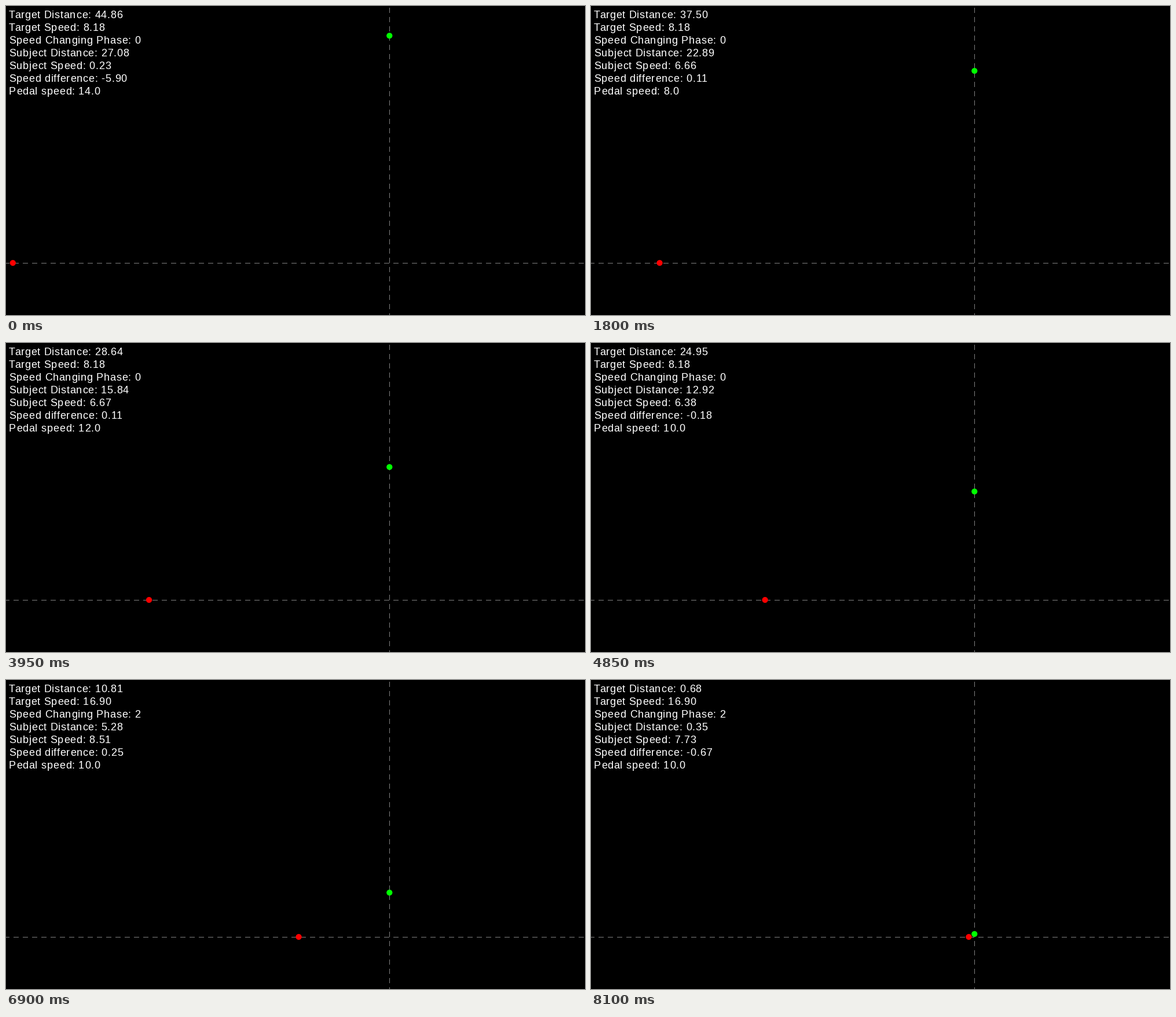
Recreate the animation shown at these times as a matplotlib script. Size 1000 px wide and 534 px high, loop 8.15 s.

```python
import numpy as np
import matplotlib.pyplot as plt
from matplotlib.animation import FuncAnimation
from matplotlib.patches import Circle
from matplotlib.textpath import TextPath

W, H, DPI = 1000, 534, 100
FRAMES, STEP = 163, 50
CROSS_X, CROSS_Y, SCALE = 662, 444, 14.5
FONT_PX, TRACKING = 18, 0.77
LEFT, BASELINE, LINE_H = 5, 21, 22

plt.rcParams["font.family"] = "Liberation Sans"

# --- motion -----------------------------------------------------------
t = np.arange(FRAMES) * STEP / 1000
KEYS = [0, 1.8, 2.8, 3.95, 5.7, 6.9, 8.1]
RAMP_START, RAMP_END = 5.11, 6.06


def travel(speed, marks):
    """Distance left at half-rate playback, passing through the marks."""
    steps = (speed[1:] + speed[:-1]) / 2 * (STEP / 2000)
    left = marks[0] - np.concatenate([[0], np.cumsum(steps)])
    at_keys = np.interp(KEYS, t, left)
    return left + np.interp(t, KEYS, np.array(marks) - at_keys)


target_speed = np.interp(t, [RAMP_START, 5.7, RAMP_END], [8.18, 13.59, 16.90])
target_dist = travel(target_speed,
                     [44.86, 37.50, 33.41, 28.64, 20.66, 10.81, 0.68])

subject_speed = np.interp(
    t,
    [0, 1.05, 1.8, 2.3, 2.8, 3.4, 3.95, 5.0, 5.7, 6.3, 6.9, 7.5, 8.1],
    [0.23, 6.5, 6.66, 6.37, 6.55, 6.67, 6.67, 6.33, 7.17, 8.22, 8.51, 8.32, 7.73])
subject_dist = travel(subject_speed,
                      [27.08, 22.89, 19.66, 15.84, 10.10, 5.28, 0.35])

time_left = np.interp(
    t,
    [0, 1.8, 2.8, 3.95, RAMP_START, 5.7, RAMP_END, 6.9, 8.1],
    [4.418, 3.495, 2.997, 2.415, 1.84, 1.385, 1.062, 0.639, 0.04167])
speed_diff = subject_speed - subject_dist / time_left

phase = (t >= RAMP_START).astype(int) + (t >= RAMP_END)

PEDAL_TIMES = np.array([0, 1.2, 2.4, 4.6, 5.2, 6.5])
PEDAL_VALUES = np.array([14, 8, 12, 10, 14, 10])
pedal = PEDAL_VALUES[np.searchsorted(PEDAL_TIMES, t, side="right") - 1]

READOUT = [
    ("Target Distance: ", target_dist, "{:.2f}"),
    ("Target Speed: ", target_speed, "{:.2f}"),
    ("Speed Changing Phase: ", phase, "{:d}"),
    ("Subject Distance: ", subject_dist, "{:.2f}"),
    ("Subject Speed: ", subject_speed, "{:.2f}"),
    ("Speed difference: ", speed_diff, "{:.2f}"),
    ("Pedal speed: ", pedal, "{:.1f}"),
]

# --- stage ------------------------------------------------------------
fig = plt.figure(figsize=(W / DPI, H / DPI), dpi=DPI, facecolor="black")
ax = fig.add_axes([0, 0, 1, 1])

dash = dict(facecolor="#808080", edgecolor="none", linewidth=0, antialiased=False)
ax.broken_barh([(x, 9) for x in range(-3, W, 16)], (CROSS_Y, 1), **dash)
for y in range(3, H, 16):
    ax.broken_barh([(CROSS_X, 1)], (y, 9), **dash)

red = ax.add_patch(Circle((0, CROSS_Y), 5.1, color="#ff0000", lw=0, zorder=3))
green = ax.add_patch(Circle((CROSS_X + 0.3, 0), 5.1, color="#00ff00", lw=0, zorder=4))

ax.set_xlim(0, W)
ax.set_ylim(H, 0)
ax.axis("off")

# --- letter-spaced text -----------------------------------------------
advances = {}


def right_edge(s):
    return TextPath((0, 0), s, size=FONT_PX).get_extents().x1


def advance(a, b):
    """Pen step from a to b, kerning included."""
    if (a, b) not in advances:
        mark = "|" if b == " " else b
        advances[a, b] = right_edge(a + mark) - right_edge(mark) + TRACKING
    return advances[a, b]


def layout(s, x):
    """Pen position of each letter, then the end position."""
    pens = [x]
    for a, b in zip(s, s[1:] + " "):
        pens.append(pens[-1] + advance(a, b))
    return pens


def glyph(x, y, c=""):
    return ax.text(x, y, c, color="white", fontsize=FONT_PX * 72 / DPI,
                   ha="left", va="baseline", zorder=5)


rows = []
for i, (label, values, fmt) in enumerate(READOUT):
    base = BASELINE + i * LINE_H
    pens = layout(label, LEFT)
    for c, x in zip(label, pens):
        if c != " ":
            glyph(x, base, c)
    rows.append((pens[-1], [glyph(0, base) for _ in range(5)], values, fmt))


def draw(k):
    red.center = (CROSS_X + 0.3 - SCALE * target_dist[k], CROSS_Y)
    green.center = (CROSS_X + 0.3, CROSS_Y - SCALE * subject_dist[k])
    for x, slots, values, fmt in rows:
        s = fmt.format(values[k])
        pens = layout(s, x)
        for j, slot in enumerate(slots):
            slot.set_text(s[j] if j < len(s) else "")
            if j < len(s):
                slot.set_x(pens[j])
    return []


anim = FuncAnimation(fig, draw, frames=FRAMES, interval=STEP,
                     repeat=True, repeat_delay=0, blit=False)
plt.show()
```
